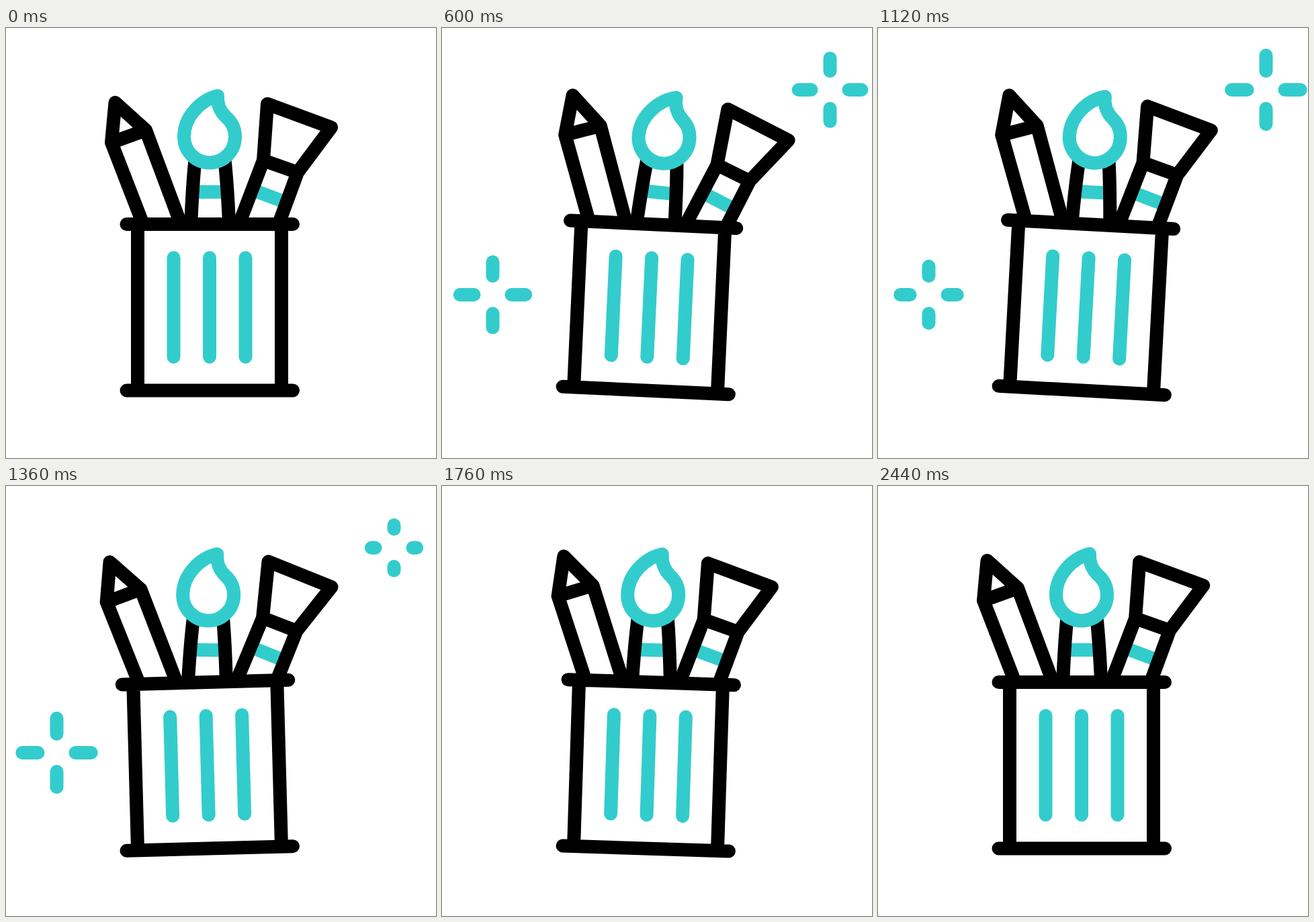
An HTML page for the animation above (2600 ms loop, 640 px wide and 640 px high).

```html
<!DOCTYPE html>
<html lang="en">
<head>
<meta charset="utf-8">
<title>Brush pot</title>
<style>
  html, body { margin: 0; width: 100%; height: 100%; overflow: hidden; background: #fff; }
  svg { display: block; width: 100vw; height: 100vh; }
  path { fill: none; stroke: #000; stroke-width: 20; stroke-linecap: round; stroke-linejoin: round; }
  .teal { stroke: #33cccc; }
  .flat { stroke-linecap: butt; }
</style>
</head>
<body>
<svg viewBox="0 0 640 640">
  <g id="pot">
    <g id="pencil">
      <path d="M211 310 L157 170.500 L162.500 111 L208 152 L267 310 M157 170.500 L208 152"/>
    </g>
    <g id="round">
      <path class="teal flat" d="M279 244 H329"/>
      <path class="flat" d="M282 192 Q277.500 230 274.500 310 M325 192 Q329.500 230 333 310"/>
      <path class="teal" d="M315 101 C290 107 265 132 265 162 C265 183 282 200.500 303 200.500 C324 200.500 341 183 341 162 C341 150 336 140 328 133 C319 125 314 113 315 101 Z"/>
    </g>
    <g id="wide">
      <path class="teal flat" d="M368 241.400 L417 259.600"/>
      <path d="M340 310 L383 197 L389 113 L484 148 L434 215 L399 310 M383 197 L434 215"/>
    </g>
    <rect x="196" y="292" width="214" height="247" fill="#fff"/>
    <path d="M196 292 v247.500 M410 292 v247.500 M179.500 292 h247.500 M179.500 539.500 h247.500"/>
    <path class="teal" d="M249.500 342 v147.500 M303 342 v147.500 M356.500 342 v147.500"/>
  </g>
  <path id="sparkR" class="teal"/>
  <path id="sparkL" class="teal"/>
</svg>
<script>
const LOOP = 2600, STEP = 40;
const SWING = 325, PULSE = 338;
const INNER = 28, OUTER = 51.3, DIP = 39.5;

const el = id => document.getElementById(id);
const ease = p => (1 - Math.cos(Math.PI * Math.min(1, Math.max(0, p)))) / 2;
const mix = (a, b, p) => a + (b - a) * ease(p);

// Runs through evenly spaced levels, one per beat, easing between neighbours.
function wave(levels, beat, t) {
  const last = levels.length - 1;
  const i = Math.min(last - 1, Math.max(0, Math.floor(t / beat)));
  return mix(levels[i], levels[i + 1], t / beat - i);
}

// The pot leads; each tool follows the same beat, later by its lag.
const swings = [
  { node: el('pot'), pivot: '303.2 539.5', lag: 0, peaks: [5, -5, 3.2, -3.2, 2] },
  { node: el('pencil'), pivot: '268 335', lag: 50, peaks: [3.8, -7.5, 3.8, -1.8, 1.8] },
  { node: el('round'), pivot: '303 345', lag: 120, peaks: [3.2, -6, 4, -3, 2] },
  { node: el('wide'), pivot: '360 345', lag: 175, peaks: [4.6, -5.6, 3.5, -3.5, 3] }
];

function angle({ peaks, lag }, t) {
  const begin = 200 + lag / 2, first = 495 + lag;
  const final = first + SWING * (peaks.length - 1), end = 2125 + 2 * lag;
  if (t < first) return mix(0, peaks[0], (t - begin) / (first - begin));
  if (t > final) return mix(peaks[peaks.length - 1], 0, (t - final) / (end - final));
  return wave(peaks, SWING, t - first);
}

const sparks = [
  { node: el('sparkR'), x: 577.5, y: 92, begin: 119 },
  { node: el('sparkL'), x: 75.5, y: 397, begin: 335 }
];
const reach = [INNER, OUTER, DIP, OUTER, INNER];

function rays({ x, y, begin }, t) {
  const age = t - begin;
  if (age < 0 || age > PULSE * (reach.length - 1)) return '';
  const r = wave(reach, PULSE, age);
  return [[1, 0], [-1, 0], [0, 1], [0, -1]].map(([dx, dy]) =>
    `M${x + dx * INNER} ${y + dy * INNER}L${x + dx * r} ${y + dy * r}`).join('');
}

function draw(t) {
  for (const s of swings) s.node.setAttribute('transform', `rotate(${angle(s, t)} ${s.pivot})`);
  for (const s of sparks) s.node.setAttribute('d', rays(s, t));
}

const start = performance.now();
function tick() {
  const t = (performance.now() - start) % LOOP;
  draw(Math.floor(t / STEP) * STEP);
  requestAnimationFrame(tick);
}
draw(0);
requestAnimationFrame(tick);
</script>
</body>
</html>
```
